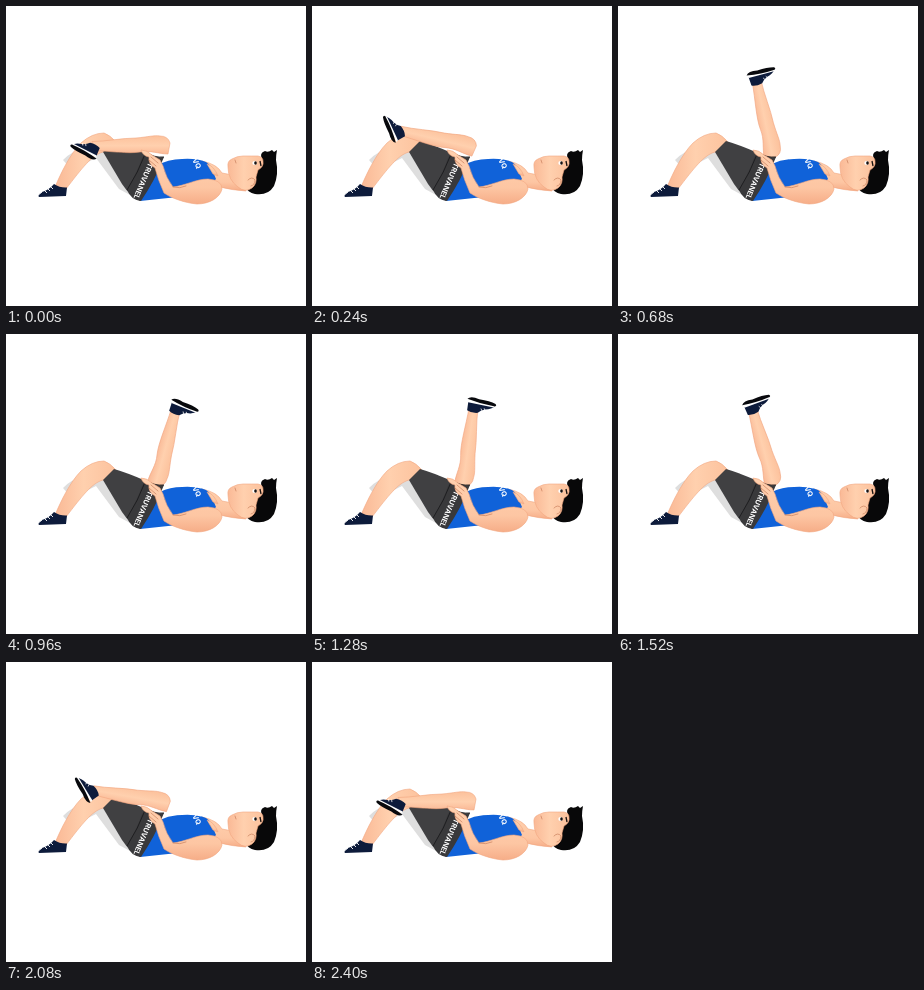
An HTML page for the animation above (2840 ms loop, 300x300 px).

```html
<!DOCTYPE html>
<html lang="en">
<head>
<meta charset="utf-8">
<title>Lying knee extension</title>
<style>
  html, body { margin: 0; width: 100%; height: 100%; overflow: hidden; background: #fff; }
  svg { display: block; width: 100vw; height: 100vh; }
  text { font: 700 7.2px Inter, Arial, sans-serif; fill: #fff; }
  .skin { stroke: #f2a680; stroke-width: .6; }
  .line { fill: none; stroke: #c9805e; stroke-width: .7; stroke-linecap: round; }
  .fold { fill: none; stroke: #1b1b1d; stroke-width: .9; }
</style>
</head>
<body>
<svg viewBox="0 0 300 300">
  <defs>
    <linearGradient id="skin" x2="1" y2="0">
      <stop stop-color="#fab996"/><stop offset=".45" stop-color="#ffd0ae"/><stop offset="1" stop-color="#fcc19c"/>
    </linearGradient>
    <linearGradient id="arm" x2="0" y2="1">
      <stop stop-color="#ffd0ae"/><stop offset=".7" stop-color="#fdc6a3"/><stop offset="1" stop-color="#f6ad88"/>
    </linearGradient>
  </defs>

  <path fill="#dedede" d="M57 154Q67 144 79 142L97 146L124 189L113 183L90 152L66 164Z"/>

  <!-- Planted leg -->
  <path class="skin" fill="url(#skin)" d="M49 181C55 167 64 148 75 137Q86 127 98 127Q104 129 110 136L112 145L97 146C86 149 76 162 60 183Z"/>
  <path fill="#0d1b3b" d="M48 178Q54 182 61 181.500L60 190L33 191Q31 189 36 186Q43 184 48 178Z"/>
  <path fill="none" stroke="#fff" stroke-width=".9" d="M31 190L36 186M39 185l2 2M42 183l2 2M45 181l2 2"/>
  <path fill="#404042" d="M108 135Q122 139 140 147L146 175L134 195Q124 190 116 178L97 146Q102 141 108 135Z"/>

  <!-- Torso, neck and head -->
  <path class="skin" fill="url(#arm)" d="M196 155Q211 158 216 167L232 170L240 185Q225 184 214 181L200 184Z"/>
  <path fill="#080809" d="M246 158Q250 153 256 153Q253 147 259 145Q262 147 266 144L268 146L271 144Q270 149 270 154Q273 168 268 180Q262 190 249 188Q240 186 239 178Z"/>
  <path class="skin" fill="url(#skin)" d="M222 161Q221 155 226 153Q231 150 237 150Q246 150 252 150Q257 151 257 155Q258 161 252 164L250 171Q251 178 246 182Q239 187 232 181Q222 174 222 161Z"/>
  <path class="line" d="M229 154l1 3M242 174q4-4 7 0q0 5-4 6"/>
  <ellipse cx="248.500" cy="157" rx="2.200" ry="2" fill="#fff"/>
  <ellipse cx="249.500" cy="157" rx="1.300" ry="1.800" fill="#17110f"/>
  <path d="M254 155l1 5" stroke="#17110f" stroke-width="1.300"/>
  <path fill="#1062d9" d="M150 160Q162 153 176 153Q190 152 200 156Q206 160 207 166L210 173L204 179L184 190Q160 192 134 195L140 174Z"/>
  <path class="skin" fill="url(#arm)" d="M201 158Q208 160 212 170L207 168Q204 163 201 158Z"/>
  <text transform="translate(186 154) rotate(62)">VQ</text>

  <!-- Raised leg -->
  <path id="shin" class="skin" fill="url(#skin)" d="M-8 10C-8 1-4-8-6-18C-8-30-5-48-4.500-66L4.500-66C4.500-52 8-36 8-22C9-10 11-4 10 2Q10 10 3 12Z"/>
  <g id="foot">
    <path fill="#0d1b3b" d="M-7-8L20-10Q18-6 11-4Q7-2 5 1Q-1 3-6 1Z"/>
    <path fill="#fff" d="M-8-9L21-11L19-8L-7-7Z"/>
    <path fill="#08090d" d="M-8.500-10Q-6-14 3-12.500Q14-13.500 20-12Q22-10.500 20-9.500Q6-8-8.500-10Z"/>
    <path stroke="#fff" stroke-width=".7" d="M7-4l1.500 2M10-5l1.500 2"/>
  </g>
  <path fill="#39393b" d="M139 147Q148 152 158 151L155 158Q149 174 135 195Q125 194 121 184Q130 169 136 152Z"/>
  <path class="fold" d="M140 146Q132 167 121 184M140 146Q148 152 158 151"/>
  <text transform="translate(142.500 156) rotate(113)">TRUVANEL</text>

  <!-- Arm holding the thigh -->
  <path class="skin" fill="url(#arm)" d="M143 151Q137 150 135 144Q141 144 146 149L154 154L157 160Q160 172 167 181C178 180 190 173 202 173Q216 174 216 183C214 192 203 198 191 198C179 197 165 192 158 187Q152 174 149 162Q142 158 143 151Z"/>
  <path class="line" d="M145 151L152 157M143 154L150 160M167 181Q174 183 180 180"/>
</svg>
<script>
  const LOOP = 2840, STEP = 40, PEAK = 1040, END = 2340;
  const KNEE = { x: 152, y: 140 }, SHIN = 64;
  const shin = document.getElementById('shin');
  const foot = document.getElementById('foot');

  function draw(now) {
    const t = Math.floor(now % LOOP / STEP) * STEP;
    const phase = t < PEAK ? t / PEAK : Math.max(0, (END - t) / (END - PEAK));
    const swing = Math.sin(phase * Math.PI / 2);
    const lift = 107 * swing * swing;
    // The ankle flexes ahead of the knee
    const flex = 29 + 70 * swing;
    const rad = lift * Math.PI / 180;
    const x = KNEE.x - SHIN * Math.cos(rad);
    const y = KNEE.y - SHIN * Math.sin(rad);
    shin.setAttribute('transform', `translate(${KNEE.x} ${KNEE.y}) rotate(${lift - 90})`);
    foot.setAttribute('transform', `translate(${x} ${y}) rotate(${lift - 180 + flex})`);
  }

  const start = performance.now();
  function tick() {
    draw(performance.now() - start);
    requestAnimationFrame(tick);
  }
  tick();
</script>
</body>
</html>
```
